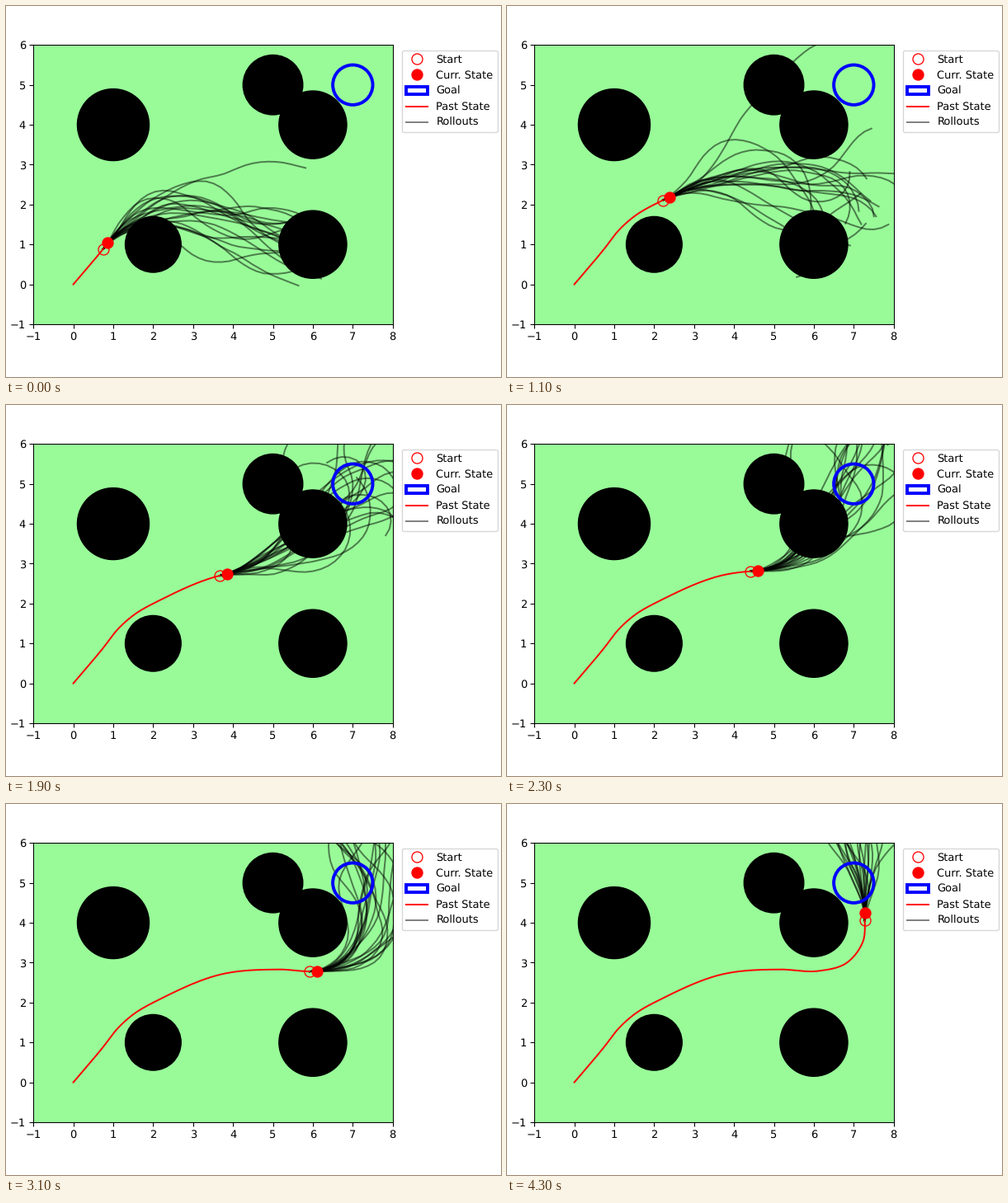
A matplotlib script that plays this animation: 600 px wide and 450 px high, repeating every 4.4 s.

```python
import numpy as np
import matplotlib.pyplot as plt
from matplotlib.animation import FuncAnimation
from matplotlib.patches import Circle

plt.rcParams.update({"font.family": "DejaVu Sans", "text.hinting": "none"})
FRAMES, INTERVAL = 44, 100
N_ROLLOUTS, STRIDE = 20, .19
GOAL = (7, 5)

# Waypoints of the drive: step, x, y
WAYPOINTS = np.array([
    (-6, 0, 0), (0, .75, .89), (3, 1.09, 1.33), (6, 1.47, 1.68),
    (11, 2.22, 2.11), (19, 3.67, 2.7), (27, 5.17, 2.83), (32, 6.1, 2.79),
    (36, 6.8, 2.98), (40, 7.23, 3.53), (44, 7.28, 4.24)])
STEPS, POINTS = WAYPOINTS[:, 0], WAYPOINTS[:, 1:]
SLOPES = np.gradient(POINTS, STEPS, axis=0)


def position(t):
    """Smooth cubic curve through the waypoints."""
    t = np.atleast_1d(t).astype(float)
    i = np.clip(np.searchsorted(STEPS, t, side="right") - 1, 0, len(STEPS) - 2)
    h = (STEPS[i + 1] - STEPS[i])[:, None]
    u = (t - STEPS[i])[:, None] / h
    return ((2 * u**3 - 3 * u**2 + 1) * POINTS[i] + (u**3 - 2 * u**2 + u) * h * SLOPES[i]
            + (3 * u**2 - 2 * u**3) * POINTS[i + 1] + (u**3 - u**2) * h * SLOPES[i + 1])


def aim_point(k):
    """Where the sampled plans head: first the lower right, later past the goal."""
    x = np.interp(k, [19, 27, 36, 43], [7, 6.7, 7.4, 7])
    y = np.interp(k, [0, 6, 11, 19, 27], [.7, 2.8, 2, 5, 7])
    return x, y


def rollouts(k):
    """Noisy steering towards the aim; overshooting plans swing back to the right."""
    rng = np.random.default_rng(100 + k)
    start, ahead = position([k, k + 1])
    aim = aim_point(k) + rng.normal(0, .6, (N_ROLLOUTS, 2))
    horizon = int(np.interp(k, [36, 43], [30, 13]))
    pos = np.tile(start, (N_ROLLOUTS, 1))
    heading = np.full(N_ROLLOUTS, np.arctan2(*(ahead - start)[::-1]))
    turn = np.zeros(N_ROLLOUTS)
    stride = STRIDE * rng.normal(1, .03, N_ROLLOUTS)
    track = [pos]
    for _ in range(horizon):
        dx, dy = (aim - pos).T
        error = (np.arctan2(dy, dx) - heading + np.pi + 1) % (2 * np.pi) - np.pi - 1
        turn = .7 * turn + .04 * np.clip(error, -2, 2) + rng.normal(0, .05, N_ROLLOUTS)
        heading = heading + turn
        pos = pos + stride[:, None] * np.column_stack([np.cos(heading), np.sin(heading)])
        track.append(pos)
    return np.array(track).transpose(1, 2, 0)


fig = plt.figure(figsize=(6.4, 4.8), dpi=93.75)
ax = fig.add_axes([33.2 / 600, 64 / 450, 435.5 / 600, 338.7 / 450])
ax.set(xlim=(-1, 8), ylim=(-1, 6), facecolor="palegreen")

start_dot, = ax.plot([], [], "o", ms=10, mfc="none", mec="red", zorder=5, label="Start")
state_dot, = ax.plot([], [], "o", ms=10, color="red", zorder=6, label="Curr. State")
goal = Circle(GOAL, .5, fill=False, ec="blue", lw=3, zorder=3, label="Goal")
ax.add_patch(goal)
past, = ax.plot([], [], color="red", zorder=4, label="Past State")
lines = [ax.plot([], [], color="black", alpha=.5)[0] for _ in range(N_ROLLOUTS)]
lines[0].set_label("Rollouts")
for x, y, r in [(2, 1, .7), (1, 4, .9), (5, 5, .75), (6, 4, .85), (6, 1, .85)]:
    ax.add_patch(Circle((x, y), r, color="black"))
ax.legend(handles=[start_dot, state_dot, goal, past, lines[0]],
          loc="upper left", bbox_to_anchor=(1.01, 1))


def update(k):
    past.set_data(*position(np.linspace(STEPS[0], k, 200)).T)
    start_dot.set_data(*position(k).T)
    state_dot.set_data(*position(k + 1).T)
    for line, track in zip(lines, rollouts(k)):
        line.set_data(*track)
    return [past, start_dot, state_dot, *lines]


def init():
    return update(0)


anim = FuncAnimation(fig, update, frames=FRAMES, init_func=init,
                     interval=INTERVAL, repeat=True, repeat_delay=0)
plt.show()
```
